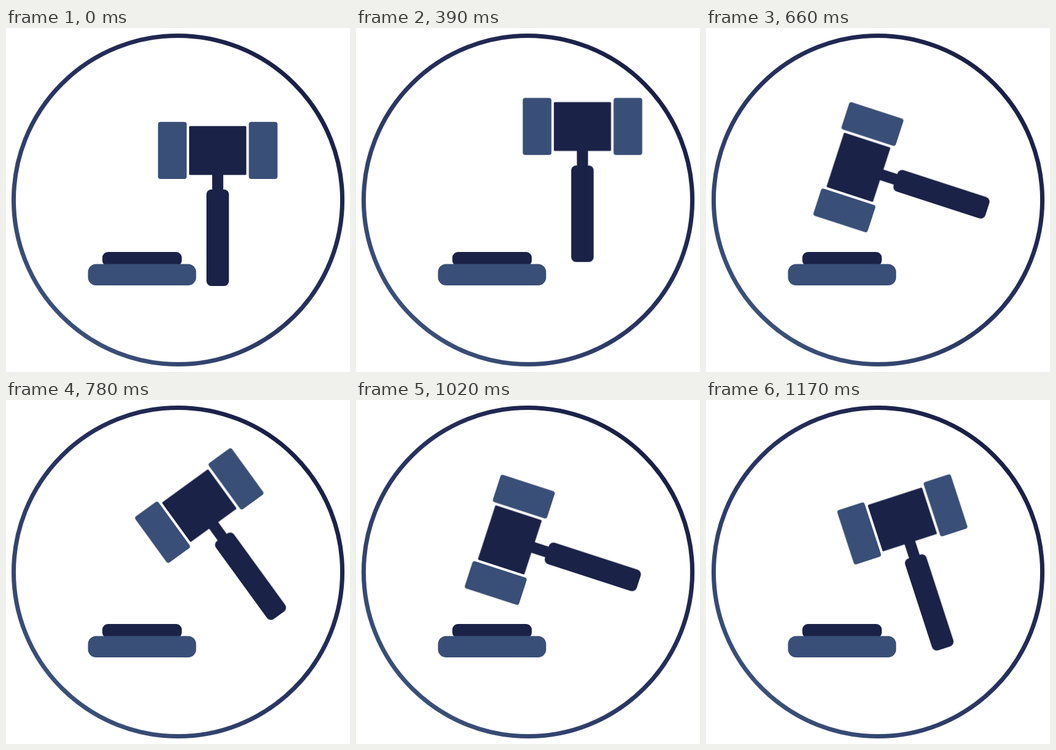
An HTML page that plays this animation: 556x556 px, repeating every 1200 ms.

```html
<!DOCTYPE html>
<html lang="en">
<head>
<meta charset="utf-8">
<title>Gavel</title>
<style>
  html, body { margin: 0; width: 100%; height: 100%; overflow: hidden; background: #fff; }
  svg { display: block; width: 100vw; height: 100vh; }
  .dark { fill: #1b2247; }
  .light { fill: #3a4f77; }

  /* Turns about the stage centre, in 30 ms steps */
  .gavel {
    transform-origin: 278px 278px;
    animation: strike 1200ms -1ms infinite;
  }
  @keyframes strike {
    0%    { transform: translate(0, 0) rotate(0deg); animation-timing-function: steps(5); }
    12.5% { transform: translate(0, 0) rotate(0deg); animation-timing-function: steps(8); }
    32.5% { transform: translate(23.8px, -38.8px) rotate(0deg); animation-timing-function: steps(2); }
    37.5% { transform: translate(31.3px, -45px) rotate(0deg); animation-timing-function: steps(2); }
    42.5% { transform: translate(29.5px, -6px) rotate(-36deg); animation-timing-function: steps(3); }
    50%   { transform: translate(22.3px, 51.5px) rotate(-90deg); animation-timing-function: steps(2); }
    55%   { transform: translate(24.7px, 32.9px) rotate(-72deg); animation-timing-function: steps(8); }
    75%   { transform: translate(34.3px, -42.5px) rotate(0deg); animation-timing-function: steps(4); }
    85%   { transform: translate(26.9px, 33.9px) rotate(-72deg); animation-timing-function: steps(1); }
    87.5% { transform: translate(24.5px, 52.5px) rotate(-90deg); animation-timing-function: steps(4); }
    97.5% { transform: translate(3px, 11px) rotate(-18deg); animation-timing-function: steps(1); }
    100%  { transform: translate(0, 0) rotate(0deg); }
  }
</style>
</head>
<body>
<svg viewBox="0 0 556 556">
  <defs>
    <linearGradient id="ring" gradientUnits="userSpaceOnUse" x1="88" y1="468" x2="468" y2="88">
      <stop offset="0" stop-color="#3a5079"/>
      <stop offset=".5" stop-color="#283260"/>
      <stop offset="1" stop-color="#1a2046"/>
    </linearGradient>
  </defs>

  <circle cx="278" cy="278" r="265.6" fill="none" stroke="url(#ring)" stroke-width="7"/>

  <g class="block">
    <rect class="dark" x="155.7" y="362" width="128.4" height="23" rx="9"/>
    <rect class="light" x="132.5" y="381.5" width="174.8" height="34.5" rx="13"/>
  </g>

  <g class="gavel">
    <rect class="light" x="245.7" y="151.7" width="46.3" height="92.3" rx="4"/>
    <rect class="light" x="392.5" y="151.7" width="46.3" height="92.3" rx="4"/>
    <rect class="dark" x="296" y="158.5" width="92.4" height="79" rx="1.5"/>
    <rect class="dark" x="333.2" y="236" width="18" height="28"/>
    <rect class="dark" x="324" y="261" width="36.3" height="156" rx="8"/>
  </g>
</svg>
</body>
</html>
```
